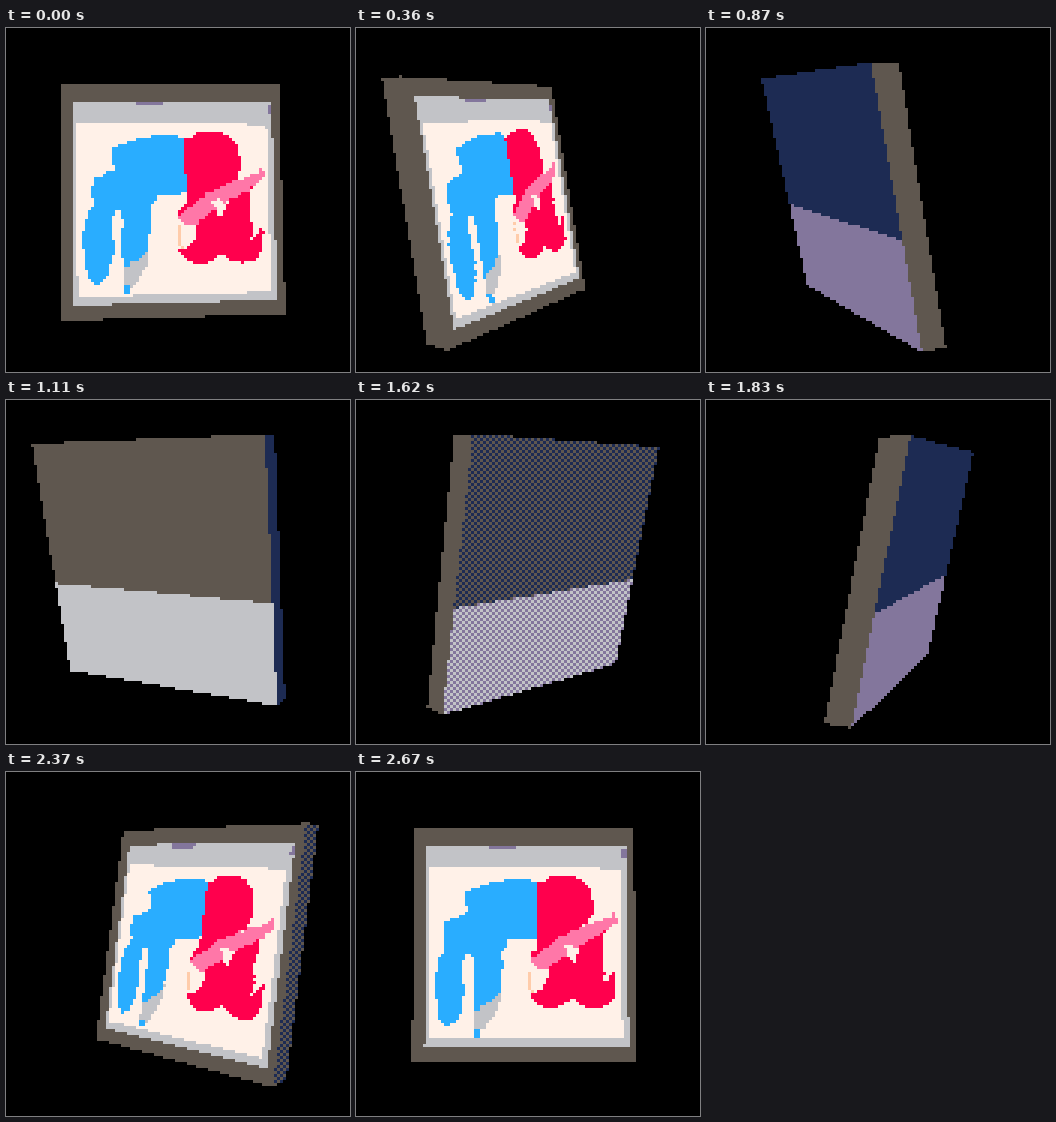
These frames come from a looping animation (344 by 344 pixels, 2.7 s). An HTML page with a canvas:

```html
<!DOCTYPE html>
<html>
<head>
<meta charset="utf-8">
<style>
html, body { margin: 0; height: 100%; overflow: hidden; background: #000; }
canvas { position: fixed; left: -20px; top: -22px; width: 384px; height: 384px; image-rendering: pixelated; }
</style>
</head>
<body>
<canvas id="screen" width="128" height="128"></canvas>
<script>
const SIZE = 128, CELL = 3;
const ctx = document.getElementById('screen').getContext('2d');
const image = ctx.createImageData(SIZE, SIZE);
const pixels = new Uint32Array(image.data.buffer);

// Palette entries and their darker versions
const NAVY = 1, PLUM = 2, BROWN = 5, GREY = 6, WHITE = 7, RED = 8, ORANGE = 9,
  BLUE = 12, MAUVE = 13, PINK = 14, PEACH = 15;
const rgb = { 0: 0x000000, 1: 0x1d2b53, 2: 0x7e2553, 5: 0x5f574f, 6: 0xc2c3c7, 7: 0xfff1e8,
  8: 0xff004d, 9: 0xffa300, 12: 0x29adff, 13: 0x83769c, 14: 0xff77a8, 15: 0xffccaa };
const shade = { 5: NAVY, 6: MAUVE, 7: GREY, 8: PLUM, 12: MAUVE, 13: BROWN, 14: RED, 15: ORANGE };
const deep = { 5: BROWN, 6: MAUVE, 7: BROWN, 8: PLUM, 12: NAVY, 13: NAVY, 14: PLUM, 15: BROWN };
const packed = {};
for (const k in rgb) {
  const c = rgb[k];
  packed[k] = (0xff000000 | (c & 255) << 16 | c & 0xff00 | c >> 16) >>> 0;
}

// The picture, painted in order
const rect = (x, y, x2, y2) => `M${x} ${y}H${x2}V${y2}H${x}Z`;
const layers = [
  [GREY, rect(68, 74, 270, 270)],
  [MAUVE, rect(130, 74, 157, 77) + rect(267, 78, 270, 85)],
  [WHITE, rect(73, 95, 264, 262)],
  [GREY, rect(244, 95, 264, 97) + 'M143 216L140 235L130 250L120 259H116V234Z'],
  [BLUE, 'M106 120L125 113L150 107H172L181 112V160L176 166H160L150 168L144 180L146 195L141 208L142 219L130 229L116 237V205L118 190L113 181H108L105 200L108 215L106 230L100 247L90 252L82 245L79 225L78 205L82 185L90 172L86 165L88 150L100 145L110 140Z' + rect(117, 254, 124, 260)],
  [RED, 'M181 112L195 105L207 103L222 107L234 118L236 140L230 152L200 168L180 184L172 188V182L181 172Z'],
  [RED, 'M188 190L207 182L216 190L218 183L222 173L247 160L246 180L243 188L247 200L244 212L250 208L254 200L259 199L255 210L256 224L250 231L235 234L222 230L216 224L205 231L190 234L178 229L172 219L180 218L187 211L190 203Z'],
  [PEACH, 'M174 194L169 202L170 214L176 219L173 210Z'],
  [PINK, 'M172 187L200 166L232 152L253 146L258 140L260 150L245 161L225 171L205 184L188 197L178 195Z'],
  [WHITE, 'M206 174L213 171L219 176L217 189L211 182Z']
].map(([color, d]) => [color, new Path2D(d)]);

const TW = 111, TH = 114;
const texture = new Uint8Array(TW * TH).fill(BROWN);
for (let i = 0; i < texture.length; i++) {
  const x = 57 + i % TW * 2, y = 58 + Math.floor(i / TW) * 2;
  for (const [color, path] of layers) if (ctx.isPointInPath(path, x, y)) texture[i] = color;
}

const HALF = [0.975, 1, 0.105];
const FOCAL = 592, CAMERA = 5, ORBIT = 0.3, SLANT = 0.21, PITCH = 0.14;
const CENTER_X = 169, CENTER_Y = 170;

function rotateX([x, y, z], a) {
  const c = Math.cos(a), s = Math.sin(a);
  return [x, y * c - z * s, y * s + z * c];
}
function rotateY([x, y, z], a) {
  const c = Math.cos(a), s = Math.sin(a);
  return [x * c + z * s, y, z * c - x * s];
}
const dot = (a, b) => a[0] * b[0] + a[1] * b[1] + a[2] * b[2];

function faceColor(axis, side, p) {
  if (axis < 2) return BROWN;
  if (side < 0) return p[1] > -0.17 ? BROWN : GREY;
  const u = Math.min(TW - 1, Math.floor((p[0] / HALF[0] + 1) / 2 * TW));
  const v = Math.min(TH - 1, Math.floor((1 - p[1]) / 2 * TH));
  return texture[Math.max(0, v) * TW + Math.max(0, u)];
}

function lit(color, light, checker) {
  if (light < 0.15) return deep[color];
  if (light < 0.42 || light < 0.545 && checker) return shade[color];
  return color;
}

function render(angle) {
  // Face normals; the front and back planes of the slab are slanted
  const axes = [[1, 0, 0], [0, 1, 0], [0, SLANT, 1]]
    .map(v => rotateX(rotateY(v, angle), PITCH));
  const toEye = [ORBIT * Math.sin(angle), 0, CAMERA + ORBIT * Math.cos(angle)];
  const eye = axes.map(a => dot(a, toEye));

  for (let y = 0; y < SIZE; y++) for (let x = 0; x < SIZE; x++) {
    const stageX = (x + 0.5) * CELL - 20, stageY = (y + 0.5) * CELL - 22;
    const ray = [(stageX - CENTER_X) / FOCAL, (CENTER_Y - stageY) / FOCAL, -1];
    const dir = axes.map(a => dot(a, ray));
    let near = -Infinity, far = Infinity, hit = 0;
    for (let k = 0; k < 3; k++) {
      const mid = -eye[k] / dir[k], span = Math.abs(HALF[k] / dir[k]);
      if (mid - span > near) { near = mid - span; hit = k; }
      far = Math.min(far, mid + span);
    }
    let color = 0;
    if (near < far) {
      const side = -Math.sign(dir[hit]);
      const point = eye.map((e, k) => e + dir[k] * near);
      const light = side * (0.4 * axes[hit][1] + 0.92 * axes[hit][2]);
      color = lit(faceColor(hit, side, point), light, (x + y) % 2 === 0);
    }
    pixels[y * SIZE + x] = packed[color];
  }
  ctx.putImageData(image, 0, 0);
}

let start, shown = -1;
function tick(now) {
  start ??= now;
  const step = Math.floor((now - start) / 30) % 90;
  if (step !== shown) render((5 + step * 4) * Math.PI / 180);
  shown = step;
  requestAnimationFrame(tick);
}
requestAnimationFrame(tick);
</script>
</body>
</html>
```
